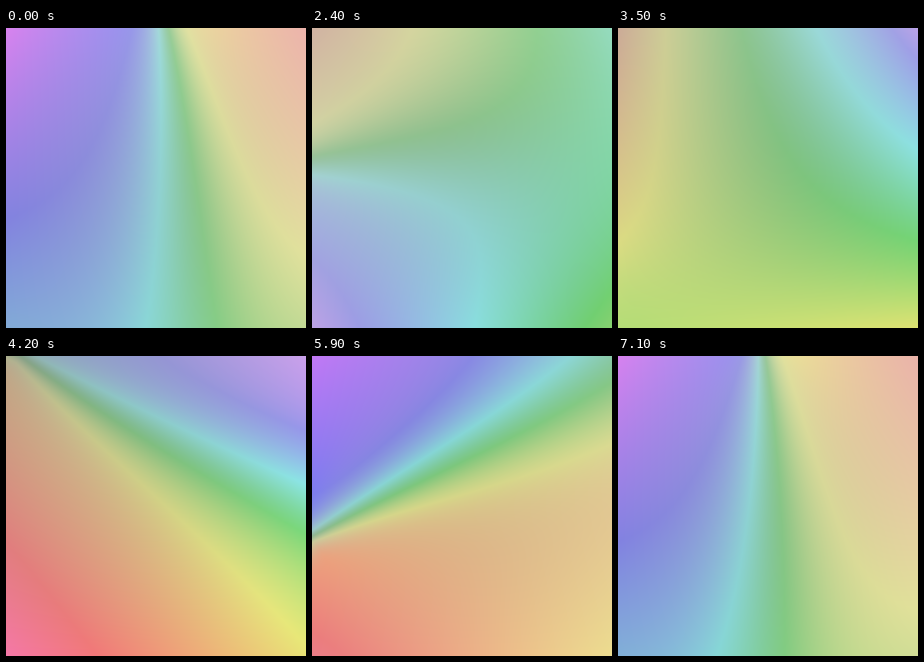
An HTML page with a canvas that plays this animation: 300x300 px, repeating every 7200 ms.

```html
<!DOCTYPE html>
<html>
<head>
<meta charset="utf-8">
<style>
html, body { margin: 0; width: 100%; height: 100%; overflow: hidden; }
canvas { display: block; width: 100%; height: 100%; }
</style>
</head>
<body>
<canvas id="stage" width="300" height="300"></canvas>
<script>
const SIZE = 300, LOOP = 7200, STEP = 100;
const ctx = document.getElementById('stage').getContext('2d');
const image = ctx.createImageData(SIZE, SIZE);

const mix = (a, b, k) => a + (b - a) * k;
const mixAll = (a, b, k) => a.map((n, i) => mix(n, b[i], k));
const bilinear = (c, u, v) => mix(mix(c[0], c[1], u), mix(c[2], c[3], u), v);

// fan: tip x, tip y, angle, bend, strength, width at tip, spread
// hue, lo, hi: corner values (top left, top right, bottom left, bottom right)
const rising = { at: 0, fan: [.52, -.05, -100, -.08, 85, .035, .25],
  hue: [203, 92, 128, 152], lo: [130, 172, 130, 155], hi: [238, 236, 215, 226] };
const sweeping = { at: 1600, fan: [-.02, 0, -171, 0, 55, .03, .13],
  hue: [110, 68, 255, 64], lo: [160, 150, 205, 135], hi: [200, 236, 245, 225] };
const crossing = { at: 3000, fan: [0, .78, -200, 0, 80, .1, .6],
  hue: [75, 290, 150, 25], lo: [165, 165, 130, 115], hi: [215, 228, 218, 225] };
const falling = { at: 4200, fan: [.05, 0, -325, -.15, 85, .03, .21],
  hue: [122, 190, 62, 137], lo: [135, 160, 120, 120], hi: [190, 235, 245, 235] };
const level = { at: 5200, fan: [0, .335, -360, -.135, 105, .025, .16],
  hue: [140, 165, 62, 153], lo: [120, 150, 120, 145], hi: [215, 230, 235, 240] };
const climbing = { at: 5900, fan: [0, .6, -390, .03, 103, .025, .2],
  hue: [172, 125, 97, 153], lo: [120, 148, 125, 145], hi: [245, 215, 235, 238] };

// One fan fades out here before the next one fades in
const flat = pose => ({
  at: 3550,
  fan: pose.fan.map((n, i) => i === 4 ? 0 : n),
  hue: [25, 262, 70, 60],
  lo: mixAll(crossing.lo, falling.lo, .5),
  hi: mixAll(crossing.hi, falling.hi, .5)
});
const turn = fan => fan.map((n, i) => i === 2 ? n - 360 : n);
const poses = [
  rising, sweeping, crossing, flat(crossing), flat(falling), falling, level, climbing,
  { ...rising, at: LOOP, fan: turn(rising.fan) }
];

function poseAt(time) {
  const i = poses.findIndex(p => p.at > time);
  const a = poses[i - 1], b = poses[i];
  const k = (time - a.at) / (b.at - a.at);
  const pose = {};
  for (const key of ['fan', 'hue', 'lo', 'hi']) pose[key] = mixAll(a[key], b[key], k);
  return pose;
}

// Share of a colour channel whose peak lies at the given hue
function channel(hue, peak) {
  const d = Math.abs(((hue - peak) % 360 + 540) % 360 - 180);
  return Math.max(0, Math.min(1, 2 - d / 60));
}

function draw(time) {
  const { fan, hue, lo, hi } = poseAt(time);
  const [tipX, tipY, degrees, bend, strength, width, spread] = fan;
  const angle = degrees * Math.PI / 180;
  const cos = Math.cos(angle), sin = Math.sin(angle);
  let p = 0;
  for (let y = 0; y < SIZE; y++) {
    const v = (y + .5) / SIZE, dy = v - tipY;
    for (let x = 0; x < SIZE; x++) {
      const u = (x + .5) / SIZE, dx = u - tipX;
      const along = dx * cos + dy * sin;
      const across = dy * cos - dx * sin - bend * along * along;
      const w = width + spread * Math.abs(along);
      const h = bilinear(hue, u, v) - strength * Math.tanh(across / w);
      const green = 18 * Math.exp(-(((h - 125) / 50) ** 2));
      const centre = 12 * Math.sin(Math.PI * u) * Math.sin(Math.PI * v);
      const low = bilinear(lo, u, v) - green * .8;
      const high = bilinear(hi, u, v) - green - centre;
      // Colours turn greyish where the fan is tight
      const grey = strength / 100 * Math.exp(-w / .06 - (across / w) ** 2 / 4);
      const middle = (low + high) / 2;
      for (const peak of [0, 120, 240]) {
        image.data[p++] = mix(mix(low, high, channel(h, peak)), middle, grey);
      }
      image.data[p++] = 255;
    }
  }
  ctx.putImageData(image, 0, 0);
}

const start = performance.now();
let shown = -1;
function tick() {
  const elapsed = (performance.now() - start) % LOOP;
  const time = Math.floor(elapsed / STEP) * STEP;
  if (time !== shown) draw(shown = time);
  requestAnimationFrame(tick);
}
tick();
</script>
</body>
</html>
```
